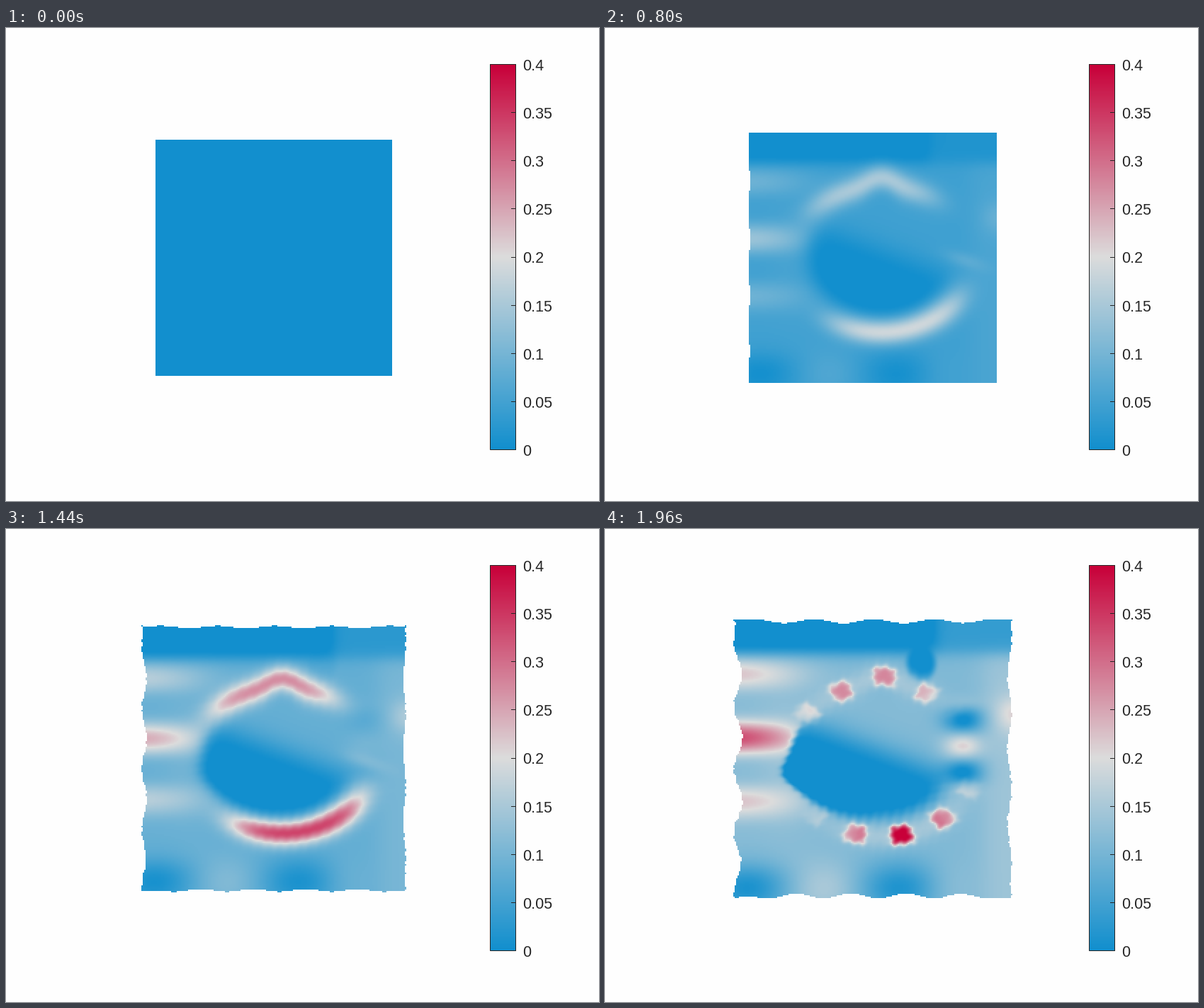
A matplotlib script that plays this animation: 837x669 px, repeating every 2000 ms.

```python
import numpy as np
import matplotlib.pyplot as plt
from matplotlib.animation import FuncAnimation
from matplotlib.colors import LinearSegmentedColormap
from matplotlib.patches import Rectangle

W, H, DPI = 837, 669, 128
FRAMES, STEP = 50, 40
PX = 72 / DPI
INK = "#262626"
VMAX = 0.4

CX, CY, HALF = 378, 325, 167      # the unloaded plate
GROW_X, GROW_Y = 29, 30.5         # stretch of each side at full load
RX, RY = 138, 112                 # the ring where the plate tears
REST = 0.145                      # strain left along a torn ring

cmap = LinearSegmentedColormap.from_list(
    "strain", ["#128fce", "#dcdcdc", "#c80039"], N=256)
cmap.set_bad((0, 0, 0, 0))

# Cells of two pixels
X0, X1, Y0, Y1 = 171, 589, 120, 532
X, Y = np.meshgrid(np.arange(X0 + 1, X1, 2.0), np.arange(Y0 + 1, Y1, 2.0))


def fade(k, a, b):
    s = np.clip((k - a) / (b - a), 0, 1)
    return s * s * (3 - 2 * s)


def step(d, soft):
    return 0.5 + 0.5 * np.tanh(d / soft)


def bump(d, width, power=2):
    return np.exp(-np.abs(d / width) ** power)


def wave(pos, at, period):
    """Cosine between 0 and 1 with a crest at the given place."""
    return 0.5 + 0.5 * np.cos(2 * np.pi * (pos - at) / period)


def turn(angle, at):
    return (angle - at + 180) % 360 - 180


def mix(v, value, weight):
    return v + (value - v) * weight


def plate_strain(x, y):
    """Smooth strain away from the ring, at full load."""
    v = 0.11 + 0.03 * step(x - 535, 20)
    v += 0.05 * bump(x - 230, 55) * bump(y - 320, 110)
    stripes = 0.12 + 0.21 * bump(y - 295, 110) * wave(y, 295, 95) ** 1.5
    v = mix(v, stripes, bump(x - 183, 88))
    v = mix(v, 0.21, bump(x - 577, 26) * bump(y - 262, 26))
    feet = 0.01 + 0.14 * wave(x, 309, 218)
    v = mix(v, feet, bump(y - 508, 38) * step(480 - x, 40))
    lid = -0.02 + 0.055 * step(x - 467, 12)
    return mix(v, lid, step(176 - y, 12))


def beads(angle, count, at):
    """Hot strain and weight of a ring broken into even pieces."""
    hot = 0.28 + 0.14 * bump(turn(angle, at), 20)
    return hot, step(wave(angle, at, 360 / count) - 0.6, 0.2)


def ring(v, r, angle, k, g, at, half, peak, start):
    """One hot arc of the ring; it tears into beads after its start."""
    torn = fade(k, start, start + 6)
    lobe = bump(turn(angle, at), half, 4)
    radius = 0.92 + 0.03 * np.sin(np.radians(angle)) + 0.04 * torn
    radius = radius + 0.11 * bump(turn(angle, -90), 12)
    d = r - radius
    v = mix(v, peak * g * (1 - torn) + REST * torn, lobe * bump(d, 0.15))
    moved = fade(k, 44, 48)
    for (count, place), share in (((11, 97), 1 - moved), ((13, 78), moved)):
        hot, piece = beads(angle, count, place)
        v = mix(v, hot, lobe * piece * bump(d, 0.12, 4) * torn * share)
    return v


def field(k):
    g = k / (FRAMES - 1)
    tear = fade(k, 31, 43)
    reach_x = HALF + GROW_X * g ** 1.35
    reach_y = HALF + GROW_Y * g ** 1.2
    mx = CX + (X - CX) * (HALF + GROW_X) / reach_x
    my = CY + (Y - CY) * (HALF + GROW_Y) / reach_y
    v = g * plate_strain(mx, my)

    # Polar frame of the ring, slightly ragged once it tears
    x = X - 390 + tear * np.sin(Y / 1.9 + X / 13)
    y = Y - 324 + tear * np.sin(X / 2.3 + Y / 11)
    r = np.hypot(x / RX, y / RY)
    angle = np.degrees(np.arctan2(y / RY, x / RX))

    # Slack inside of the ring, dark below a falling diagonal
    left = tear * np.clip(-np.cos(np.radians(angle)), 0, 1)
    edge = 0.74 + left * (0.19 + 0.11 * bump(Y - 347, 22))
    slope = Y - 277 - 0.37 * (X - 290)
    inner = 0.115 - 0.14 * step(slope, 26)
    v = mix(v, inner * g, step(edge - r, 0.12 - 0.09 * left))

    # Light arc, then light and dark patches on the right
    arc = bump(X - 513, 32) * bump(Y - 330 - 0.3 * (X - 513), 11)
    v = mix(v, 0.18 * g, arc * (1 - tear))
    patches = -0.02 + 0.23 * wave(Y, 307, 78)
    span = bump(X - 505, 27) * bump(Y - 308, 62, 6)
    v = mix(v, patches, span * fade(k, 34, 43))
    pocket = bump(np.hypot((X - 446) / 21, (Y - 190) / 25), 1, 6)
    v = mix(v, -0.01, pocket * fade(k, 34, 43))

    v = ring(v, r, angle, k, g, at=77, half=48, peak=0.46, start=37)
    v = ring(v, r, angle, k, g, at=-98, half=47, peak=0.37, start=42)

    # Rippled sides that leave the corners in place
    bend = g ** 1.8
    side = bend * (1 - np.clip(np.abs(Y - CY) / reach_y, 0, 1) ** 6)
    rim = bend * (1 - np.clip(np.abs(X - CX) / reach_x, 0, 1) ** 6)
    rough = 1.2 * np.sin(my / 2.3) * np.sin(my / 9) * bend
    inside = ((X > CX - reach_x + 12 * side * wave(my, 295, 90) + rough)
              & (X < CX + reach_x - 6 * side * wave(my, 312, 107) - rough)
              & (Y > CY - reach_y + 6 * rim * wave(mx, 422, 85))
              & (Y < CY + reach_y - 7 * rim * wave(mx, 425, 78)))
    return np.ma.masked_where(~inside, v)


fig = plt.figure(figsize=(W / DPI, H / DPI), dpi=DPI, facecolor="#fefefe")
ax = fig.add_axes([0, 0, 1, 1])
ax.axis("off")


def show(data, extent):
    return ax.imshow(data, cmap=cmap, vmin=0, vmax=VMAX, aspect="auto",
                     interpolation="nearest", extent=extent)


plate = show(field(0), (X0, X1, Y1, Y0))

BX, BY, BW, BH = 683, 51, 36, 545
show(np.linspace(VMAX, 0, 256)[:, None], (BX, BX + BW, BY + BH, BY))
ax.add_patch(Rectangle((BX, BY), BW, BH, fill=False, ec=INK, lw=PX))
for i in range(9):
    y = BY + BH * (1 - i / 8)
    ax.plot([BX + BW - 6, BX + BW], [y, y], color=INK, lw=PX)
    ax.text(729, y + 9, f"{i * 0.05:.2g}", family="Liberation Sans",
            size=21.5 * PX, color=INK, va="baseline")
ax.set_xlim(0, W)
ax.set_ylim(H, 0)


def update(k):
    plate.set_data(field(k))
    return [plate]


anim = FuncAnimation(fig, update, frames=FRAMES, interval=STEP,
                     repeat=True, repeat_delay=0, blit=False)
plt.show()
```
